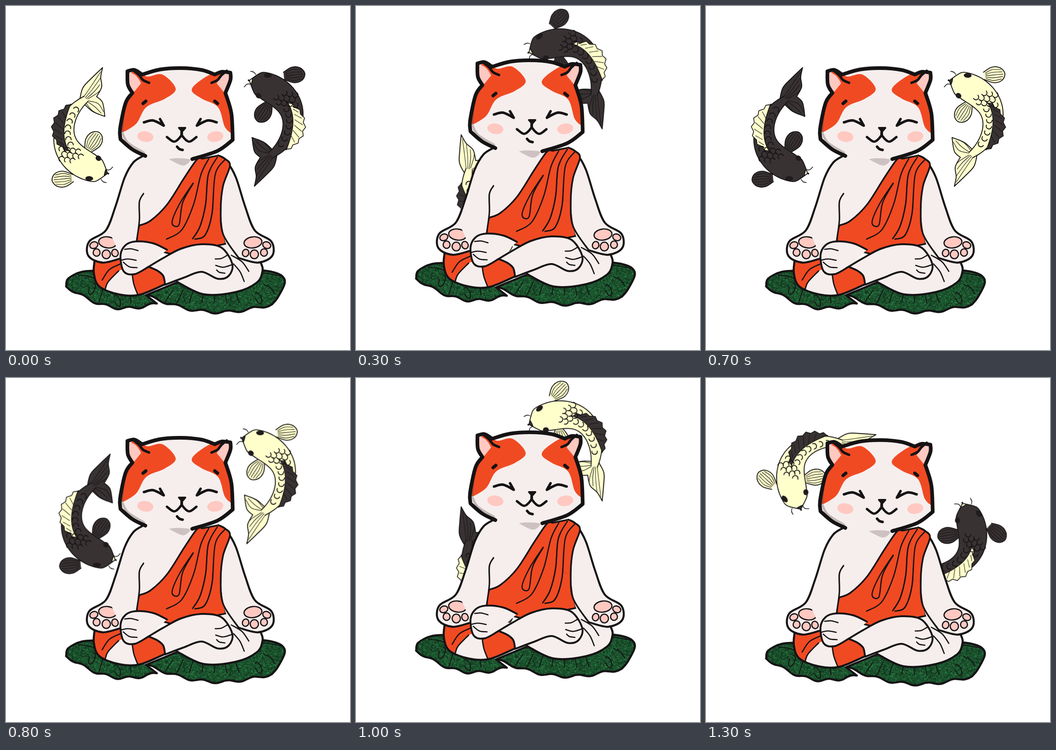
An HTML page with a canvas for the animation above (1400 ms loop, 748 px wide and 748 px high).

```html
<!DOCTYPE html>
<html lang="en">
<head>
<meta charset="utf-8">
<title>Meditating cat with koi</title>
<style>
html, body { margin: 0; width: 100%; height: 100%; overflow: hidden; background: #fff; }
canvas { display: block; }
</style>
</head>
<body>
<canvas id="stage" width="748" height="748"></canvas>
<script>
const SIZE = 748, STEP = 100, HALF = 7;
const INK = "#151314", FUR = "#f6eeed", ORANGE = "#f04a23", PINK = "#ffc8c1";
const CREAM = "#ffffcc", DARK = "#393233";

const stage = document.getElementById("stage").getContext("2d");
let g;

const lerp = (a, b, t) => a + (b - a) * t;
const clamp = t => Math.max(0, Math.min(1, t));
const range = (n, fn) => Array.from({ length: n }, (_, i) => fn(i));

// Smooth curve through points; "|" marks a corner.
function path(text) {
  const p = new Path2D();
  let last;
  for (const part of text.split("|")) {
    const n = part.trim().split(/\s+/).map(Number);
    const pts = last ? [last] : [];
    for (let i = 0; i < n.length; i += 2) pts.push([n[i], n[i + 1]]);
    if (!last) p.moveTo(...pts[0]);
    for (let i = 0; i < pts.length - 1; i++) {
      const b = pts[i], c = pts[i + 1], a = pts[i - 1] || b, d = pts[i + 2] || c;
      p.bezierCurveTo(
        b[0] + (c[0] - a[0]) / 6, b[1] + (c[1] - a[1]) / 6,
        c[0] - (d[0] - b[0]) / 6, c[1] - (d[1] - b[1]) / 6, c[0], c[1]);
    }
    last = pts[pts.length - 1];
  }
  return p;
}

const join = (pts, gap = " ") => pts.map(p => p.join(" ")).join(gap);

function fill(text, color) {
  g.fillStyle = color;
  g.fill(path(text));
}

function line(text, width, color = INK) {
  g.lineWidth = width;
  g.strokeStyle = color;
  g.stroke(path(text));
}

function shape(text, color, width) {
  fill(text, color);
  line(text, width);
}

function oval(x, y, rx, ry, turn, color, width) {
  g.beginPath();
  g.ellipse(x, y, rx, ry, turn, 0, Math.PI * 2);
  g.fillStyle = color;
  g.fill();
  g.lineWidth = width;
  g.strokeStyle = INK;
  if (width) g.stroke();
}

function inside(text, draw) {
  g.save();
  g.clip(path(text));
  draw();
  g.restore();
}

// Draws a part and its mirror image.
function both(draw, axis = 379) {
  draw();
  g.save();
  g.translate(2 * axis, 0);
  g.scale(-1, 1);
  draw();
  g.restore();
}

function layer(draw) {
  const c = document.createElement("canvas");
  c.width = c.height = SIZE;
  g = c.getContext("2d");
  g.lineCap = g.lineJoin = "round";
  draw();
  return c;
}

function grass() {
  let seed = 77;
  const rnd = () => (seed = (seed * 16807) % 2147483647) / 2147483647;
  g.fillStyle = "#1b5a30";
  g.fillRect(120, 560, 500, 120);
  g.lineWidth = 1;
  for (let i = 0; i < 9000; i++) {
    const x = 125 + rnd() * 490, y = 565 + rnd() * 110, a = rnd() * Math.PI, r = 2 + rnd() * 3;
    g.strokeStyle = `hsl(139 45% ${10 + 42 * rnd() * rnd()}%)`;
    g.beginPath();
    g.moveTo(x, y);
    g.lineTo(x + Math.cos(a) * r, y + Math.sin(a) * r);
    g.stroke();
  }
}

// Rippled hem of a leaf.
const hem = (x0, y0, x1, y1, waves) => join(range(31, i => {
  const t = i / 30;
  return [lerp(x0, x1, t), lerp(y0, y1, t) + 26 * Math.sin(Math.PI * t) + 3 * Math.sin(waves * 2 * Math.PI * t)];
}));

function leaf(edge, veins) {
  inside(edge, () => {
    grass();
    veins();
  });
  line(edge, 4.5);
}

function veins(x0, gap, n, axis) {
  range(n, i => {
    const x = x0 + gap * i;
    line(`${x} 644 ${lerp(x, axis, 0.17)} 617`, 2);
  });
}

function curl(x, y, turn) {
  g.beginPath();
  g.ellipse(x, y, 6, 13, turn, -2, 3.2);
  g.lineWidth = 2;
  g.strokeStyle = INK;
  g.stroke();
}

function leaves() {
  leaf(`210 574 165 577 135 592 131 609 | ${hem(131, 609, 328, 646, 4)} | 306 629`, () => {
    line("157 584 175 586 192 590", 2);
    curl(187, 614, 0.4);
    curl(242, 640, -0.4);
    veins(202, 70, 2, 250);
  });
  leaf(`540 572 578 577 600 586 606 602 590 634 578 648 | ${hem(578, 648, 304, 628, 5)} | 372 600`, () => {
    veins(345, 27, 7, 450);
    curl(549, 634, -0.4);
    line("560 604 575 612 585 625", 2);
    line("551 579 575 582 600 587", 2);
  });
}

function thighs() {
  shape("478 517 520 536 554 557 | 558 574 546 600 500 621 430 626 372 599", FUR, 4.5);
  line("490 541 513 555 528 576", 2.6);
  line("495 560 509 577 518 598", 2.6);

  const edge = "193 550 191 580 203 609 245 626 290 627 346 604";
  fill(edge + " | 345 550 | 250 535", FUR);
  inside(edge + " | 345 550 | 250 535", () => {
    fill("185 540 | 185 620 | 216 616 | 222 599 245 575 274 568 | 250 540", ORANGE);
    shape("274 560 | 274 577 278 604 288 630 | 350 620 | 350 560", ORANGE, 2.8);
  });
  line(edge, 4.5);
  line("216 614 222 599 245 575", 2.8);
  line("251 559 225 572 209 595", 2.6);
}

function feet() {
  shape("350 529 320 515 282 511 260 519 249 541 256 576 280 582 310 566", FUR, 4);
  shape("310 566 342 547 380 527 425 517 468 524 492 560 484 586 460 592 425 577 386 590 346 605 | 342 586 330 575 310 566", FUR, 4);
  line("258 528 272 527 287 531", 2.6);
  line("250 552 265 549 283 552", 2.6);
  line("255 556 268 566 285 568", 2.6);
  line("455 549 468 548 481 541", 2.6);
  line("456 563 472 567 490 562", 2.6);
  line("458 573 464 578 476 580", 2.6);
}

function torso() {
  fill("300 322 | 268 350 | 217 487 | 250 552 | 300 540 | 480 530 | 488 345 | 425 322", FUR);
  shape("427 331 | 415 333 388 372 350 431 314 466 290 476 | 286 492 284 518 | 365 540 | 478 516 | 467 440 472 390 487 346 | 476 331 462 324 | 427 331", ORANGE, 3.5);
  line("441 331 424 365 408 430 382 486 349 506", 2.6);
  line("460 327 440 365 434 430 422 478 406 505", 2.6);
  line("476 333 455 365 448 450 433 497 411 506", 2.6);
  line("407 384 377 430 361 470 376 475 384 427 407 385", 2.6);
}

function arm() {
  shape("298 325 277 339 258 372 238 435 217 487 181 511 179 542 210 557 252 547", FUR, 4.3);
  oval(221, 513, 19.5, 12, 0.13, PINK, 2.6);
  oval(191, 519, 9, 7, -0.4, PINK, 2.6);
  oval(197, 535, 7.5, 8, 0, PINK, 2.6);
  oval(218, 539, 9, 9.5, 0, PINK, 2.6);
  oval(237, 536, 7, 8, -0.3, PINK, 2.6);
}

function arms() {
  const sleeve = "299 324 | 217 487 | 252 547 | 284 515 | 290 465 289 435 299 407";
  fill(sleeve, FUR);
  fill("487 346 | 541 487 | 506 547 | 478 515 467 440 472 390 487 346", FUR);
  both(arm);
  fill("302 326 | 300 407 | 284 512 | 250 545 | 225 490 | 265 370", FUR);
  line("299 407 290 425 290 465 284 510", 3.2);
  shape("460 324 | 487 346 472 390 467 440 | 452 440 | 445 350", ORANGE, 0.1);
  line("460 327 440 365 434 430 422 478 406 505", 2.6);
  line("476 333 455 365 448 450 433 497 411 506", 2.6);
  line("462 324 476 331 487 346 472 390 467 440 472 495 506 547", 3.6);
}

function head() {
  const skull = "303 325 275 311 249 289 | 248 266 260 210 275 188 | 265 170 264 141 | 279 138 296 148 | 335 137 380 134 425 138 454 148 | 470 142 488 144 | 488 160 477 188 | 490 232 493 290 | 460 314 405 332";
  fill(skull, FUR);
  inside(skull, () => {
    fill("285 130 | 305 152 340 148 369 179 345 201 305 219 283 255 252 275 | 240 180", ORANGE);
    fill("490 130 | 438 151 404 180 425 200 461 219 476 262 493 278 | 505 180", ORANGE);
    both(() => fill("262 140 | 282 150 294 167 | 276 189 | 255 170", PINK), 376);
    line("256 225 252 273", 5, "rgba(110,75,65,.45)");
    line("253 275 265 296 300 318", 5, "#c2b7b6");
  });
  line(skull, 8);
  both(() => line("278 140 290 150 298 160 311 166", 5.5));
  both(() => {
    line("298 211 304 206", 7);
    line("300 252 320 248 343 259 | 335 245", 5.5);
    oval(303, 283, 17.5, 11.5, 0.15, PINK);
  });
  shape("376 264 | 390 264 | 383 272 | 376 264", INK, 4);
  both(() => line("382 272 381 281 366 294 350 284", 5.2), 382);
  line("372 305 377 310 384 312", 5.5);
  fill("354 332 372 330 400 333 385 346 354 332", "#cdc1c1");
}

// Point on the koi's spine: t from tail to nose, off toward its back.
function spine(t, off = 0) {
  const axis = (a, b, c, d) => {
    const s = 1 - t;
    return [a * s ** 3 + 3 * b * s * s * t + 3 * c * s * t * t + d * t ** 3,
      (b - a) * s * s + 2 * (c - b) * s * t + (d - c) * t * t];
  };
  const [x, dx] = axis(174, 118, 89, 221), [y, dy] = axis(202, 240, 331, 364);
  const len = Math.hypot(dx, dy);
  return [x - dy / len * off, y + dx / len * off];
}

const girth = t => (7 + 32 * t) * Math.sqrt(1 - t ** 10);

function fin(x, y, turn, color) {
  g.save();
  g.translate(x, y);
  g.rotate(turn);
  shape("0 -8 18 -17 36 -15 46 -2 40 12 22 17 0 8", color, 1.9);
  range(5, i => {
    const k = i - 2;
    line(`4 ${k * 3} 20 ${k * 6} ${42 - k * k} ${k * 5}`, 1.1);
  });
  g.restore();
}

function tail(color) {
  shape("160 206 167 178 186 157 210 134 | 206 155 208 176 197 197 | 210 210 215 240 | 188 229 165 208", color, 1.9);
  range(4, i => line(`${166 + i * 4} 202 ${184 + i * 4} ${176 + i * 5} ${206 - i} ${143 + i * 14}`, 1.1));
  range(3, i => line(`${178 - i * 4} 206 ${200 - i * 7} ${212 + i * 7} ${212 - i * 5} ${230 + i * 3}`, 1.1));
}

function backFin(color) {
  const rim = u => 14 * (1 - u) + 20 * Math.sin(Math.PI * u);
  const at = (u, off) => spine(0.15 + 0.52 * u, off);
  const teeth = range(15, i => at(i / 14, rim(i / 14) + (i % 2 ? 3 : -2)));
  const root = range(9, i => at(1 - i / 8, 14 * (i / 8) ** 3));
  shape(join(teeth, " | ") + " | " + join(root) + " | " + teeth[0].join(" "), color, 1.6);
  range(6, i => {
    const u = 0.2 + i * 0.11;
    line(join([at(u + 0.08, 5), at(u, rim(u) - 4)]), 1.1);
  });
}

function scale(x, y, turn) {
  g.beginPath();
  g.arc(x, y, 6, turn - 1.7, turn + 1.7);
  g.lineWidth = 1.9;
  g.strokeStyle = INK;
  g.stroke();
}

function koi(main, other) {
  tail(main);
  fin(178, 314, -1, main);
  fin(146, 374, 3.05, main);

  const side = s => range(21, i => spine(i / 20, s * girth(i / 20)));
  const body = join([...side(1), ...side(-1).reverse()]);
  fill(body, main);
  inside(body, () => oval(224, 363, 9, 20, 0.3, other, 1.9));
  line(body, 1.9);
  backFin(other);

  range(7, i => scale(...spine(0.16 + i * 0.075, -3 - i), -0.9 - i * 0.13));
  range(11, i => {
    const row = Math.floor(i / 4), col = i % 4;
    scale(121 + col * 12 + (row % 2) * 6, 311 + row * 11 + col * 2, -2.2);
  });
  oval(181, 375, 8.5, 5, 0.05, "#201b1c");
  oval(201, 331, 5.5, 6.5, -0.9, "#201b1c");
  line("219 356 226 356 232 350", 1.5);
  line("207 377 211 382 218 384", 1.5);
}

const cat = layer(() => [leaves, thighs, torso, arms, feet, head].forEach(draw => draw()));
const pale = layer(() => koi(CREAM, DARK));
const black = layer(() => koi(DARK, CREAM));

// Lower half of the orbit: step, x, y, turn in degrees.
const keys = [
  [0, 213.5, 247, 0], [1, 230, 278.5, 0], [3, 305.5, 363, -41],
  [5, 444, 385, -112], [6, 476, 356.5, -132]
];

function pose(step) {
  const k = step % HALF;
  const n = keys.findLastIndex(key => key[0] <= k);
  const a = keys[n], b = keys[n + 1] || a;
  const t = a === b ? 0 : (k - a[0]) / (b[0] - a[0]);
  const [, x, y, turn] = a.map((v, j) => lerp(v, b[j], t));
  if (step % (2 * HALF) < HALF) return [x, y, turn];
  // The upper half is the lower one turned about a slowly drifting centre.
  const cx = 375 + 7 * clamp((k - 1) / 2), cy = 263 + 16 * clamp((k - 1) / 3);
  return [2 * cx - x, 2 * cy - y, turn - 180];
}

function swim(img, step) {
  const [x, y, turn] = pose(step);
  stage.save();
  stage.translate(x, y);
  stage.rotate(turn * Math.PI / 180);
  stage.drawImage(img, -213.5, -247);
  stage.restore();
}

// Rises over three steps, sinks over two, then rests.
const bob = k => Math.trunc(-17 * (k <= 3 ? k / 3 : clamp((5 - k) / 2)));

const start = performance.now();
function frame() {
  const step = Math.floor((performance.now() - start) / STEP) % (2 * HALF);
  stage.fillStyle = "#fff";
  stage.fillRect(0, 0, SIZE, SIZE);
  swim(pale, step);
  swim(black, step + HALF);
  stage.drawImage(cat, 0, bob(step % HALF) + 1);
  requestAnimationFrame(frame);
}
frame();
</script>
</body>
</html>
```
